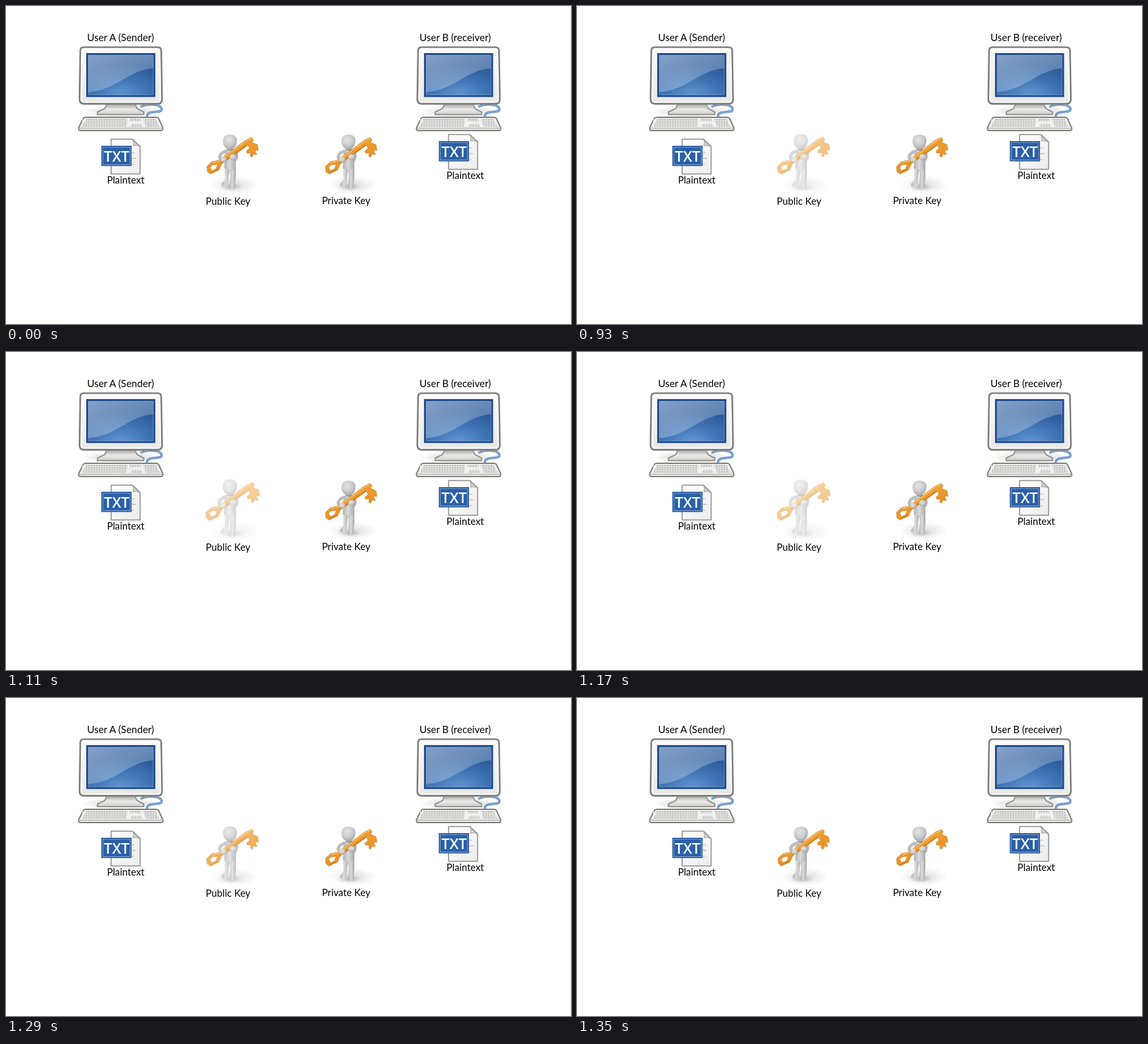
Animation of 853 by 480 pixels, one loop 1.88 s. Source, as an HTML page:

```html
<!DOCTYPE html>
<html lang="en">
<head>
<meta charset="utf-8">
<title>Public and private keys</title>
<style>
  html, body { margin: 0; width: 100%; height: 100%; overflow: hidden; background: #fff; }
  svg { display: block; width: 100%; height: 100%; }
  .label { font: 15px Lato, Carlito, sans-serif; text-anchor: middle; fill: #000; }
  .small { font-size: 14.7px; }
  .badge { font: 600 22px "Open Sans", "Noto Sans", sans-serif; text-anchor: middle; fill: #fff; }
  .pulse { transform-origin: 341px 236px; animation: pulse 1880ms step-end infinite; }
  /* quick half fade with a slight swell, sampled every 60 ms */
  @keyframes pulse {
    0%     { opacity: 1;   transform: scale(1); }
    49.46% { opacity: .56; transform: scale(1.018); }
    52.65% { opacity: .5;  transform: scale(1.03); }
    55.85% { opacity: .5;  transform: scale(1.042); }
    59.04% { opacity: .5;  transform: scale(1.046); }
    62.23% { opacity: .5;  transform: scale(1.034); }
    65.42% { opacity: .5;  transform: scale(1.022); }
    68.61% { opacity: .75; transform: scale(1.01); }
    71.8%  { opacity: 1;   transform: scale(1); }
  }
</style>
</head>
<body>
<svg viewBox="0 0 853 480">
  <defs>
    <linearGradient id="case" x1="0" y1="0" x2="0" y2="1">
      <stop offset="0" stop-color="#fafafa"/><stop offset="1" stop-color="#e8e8e6"/>
    </linearGradient>
    <radialGradient id="screen" cx=".5" cy="1" r=".75">
      <stop offset="0" stop-color="#5f97d3"/><stop offset=".55" stop-color="#3f74b4"/><stop offset="1" stop-color="#2c5c9c"/>
    </radialGradient>
    <linearGradient id="glare" x1="0" y1="0" x2="1" y2="1">
      <stop offset="0" stop-color="#fff" stop-opacity=".42"/><stop offset="1" stop-color="#fff" stop-opacity=".14"/>
    </linearGradient>
    <linearGradient id="stand" x1="0" y1="0" x2="0" y2="1">
      <stop offset="0" stop-color="#a2a3a1"/><stop offset=".5" stop-color="#ececeb"/><stop offset="1" stop-color="#c9cac7"/>
    </linearGradient>
    <linearGradient id="paper" x1="0" y1="0" x2="1" y2="1">
      <stop offset="0" stop-color="#fff"/><stop offset="1" stop-color="#ececeb"/>
    </linearGradient>
    <linearGradient id="gold" x1="0" y1="0" x2=".6" y2="1">
      <stop offset="0" stop-color="#f6ac40"/><stop offset="1" stop-color="#e48a1c"/>
    </linearGradient>
    <radialGradient id="skin" cx=".42" cy=".35" r=".68">
      <stop offset="0" stop-color="#e4e4e4"/><stop offset=".6" stop-color="#cacaca"/><stop offset="1" stop-color="#a0a0a0"/>
    </radialGradient>
    <linearGradient id="limb">
      <stop offset="0" stop-color="#b2b2b2"/><stop offset=".45" stop-color="#dadada"/><stop offset="1" stop-color="#a8a8a8"/>
    </linearGradient>
    <radialGradient id="shade">
      <stop offset="0" stop-color="#777" stop-opacity=".42"/><stop offset="1" stop-color="#777" stop-opacity="0"/>
    </radialGradient>

    <path id="cable" d="M203 152C218 146 235 149 235 156C235 163 212 156 213 167" fill="none"/>

    <g id="computer">
      <ellipse cx="174" cy="159" rx="60" ry="9" fill="url(#shade)"/>
      <use href="#cable" stroke="#3d6eae" stroke-width="3.2"/>
      <use href="#cable" stroke="#8db4e2" stroke-width="1.6"/>
      <path d="M152 148H195L198 155L208 160V164H138V160L149 155Z" fill="url(#stand)" stroke="#858782" stroke-width="1.6" stroke-linejoin="round"/>
      <path d="M117 62.2H229Q234 62.2 234.3 67L235.6 141Q235.6 147.6 229 147.6H118Q111 147.6 111 141L112.2 67Q112.4 62.2 117 62.2Z" fill="url(#case)" stroke="#7d7f7a" stroke-width="2.6"/>
      <path d="M118 64.5H228.5Q232 64.5 232.2 68L233.2 140Q233 145.2 228 145.2H119Q113.5 145.2 113.5 140L114.6 68Q114.8 64.5 118 64.5Z" fill="none" stroke="#fff" stroke-width="1.5"/>
      <rect x="122.5" y="72.5" width="101.5" height="63.5" fill="url(#screen)" stroke="#1f4a8a" stroke-width="2.8"/>
      <path d="M124 74H222.5V94C183 97 168 127 124 130Z" fill="url(#glare)"/>
      <rect x="124.6" y="74.6" width="97.4" height="59.4" fill="none" stroke="#a2bfdf" stroke-opacity=".4"/>
      <path d="M120 168H227Q229.5 168 230.5 170L236.5 183Q238 188 234 188H112.5Q108.5 188 110 183L116.5 170Q117.5 168 120 168Z" fill="#f2f2f0" stroke="#7f817c" stroke-width="2"/>
      <path d="M111 184.5H235.5" stroke="#bfc0bc" stroke-width="2"/>
      <path d="M121 170.5H183L182 182H114.5ZM187 170.5H203L204 174.5H186.5ZM189 178H204L206 182H188ZM207 170.5H226L231.5 182H211Z" fill="#bcbdb9"/>
      <g stroke="#f0f0ee">
        <path d="M118 173.5H228M116 176.5H229M114 179.5H231"/>
        <path d="M115 176H231" stroke-width="12" stroke-dasharray=".9 3"/>
      </g>
    </g>

    <g id="file">
      <path d="M158.700 201H191L202.500 212V253.500H158.700Z" fill="url(#paper)" stroke="#8c8e8b" stroke-width="1.500" stroke-linejoin="round"/>
      <path d="M190.500 201.500C193 204 192.500 208 191.500 211C196 210 200 210.500 202.500 213Z" fill="#cfd0cd" stroke="#9b9d99" stroke-width=".9"/>
      <path d="M190 221.500H194M190 230H196M190 239H193" stroke="#c2c3c0" stroke-width="1.600"/>
      <rect x="144" y="211" width="45.500" height="30.500" fill="#1e4f94"/>
      <rect x="146" y="213" width="41.500" height="26.500" fill="#2a60a9" stroke="#86a8d2"/>
      <text class="badge" x="167" y="234.500">TXT</text>
    </g>

    <g id="holder">
      <ellipse cx="345" cy="270" rx="36" ry="14" fill="url(#shade)" opacity=".6"/>
      <ellipse cx="340" cy="273" rx="18" ry="6" fill="url(#shade)"/>
      <path d="M330 240H339L336.500 255L335 270Q333 274 327 272Q323.500 270 326.500 267L330.500 262Z" fill="url(#limb)"/>
      <path d="M338 240H347L347 257L346 269Q348 276 342 277Q336 277 337.500 271L338.500 259Z" fill="url(#limb)"/>
      <path d="M331 218Q338 214 345 218Q348 221 347 229L347 245Q338 249 329.500 245L330 231Z" fill="url(#limb)"/>
      <path d="M334 216Q338 219 343 216" fill="none" stroke="#858585" stroke-width="1.500"/>
      <path d="M327.500 203C328 197 332 194 338 194C344 194 348.500 197 348.500 203C348.500 211 344 216.500 338 216.500C332 216.500 327.200 211 327.500 203Z" fill="url(#skin)"/>
      <path d="M332 219Q323 222 322.500 228Q324 233 330 232" fill="none" stroke="#bdbdbd" stroke-width="5" stroke-linecap="round"/>
      <path d="M346 220Q350 226 346 232" fill="none" stroke="#b2b2b2" stroke-width="5" stroke-linecap="round"/>
      <path fill-rule="evenodd" fill="url(#gold)" stroke="#c47a1c" stroke-width=".7" stroke-linejoin="round"
        d="M303.500 242L311 235L321 233L362 202.500L371 198.500L373.500 202L371.500 206L379.500 209.500L381 218L377 217L376.500 221L379 223L376.500 224.500L374 223L371 228.500L368.500 226L370 222L364 222L363 219L367.500 215L365.500 210L325.500 238.500L321.500 247.500L308.500 253.500L304 250ZM308 243L310.500 248.500L317 246L319.500 239L312.500 239.500Z"/>
      <path d="M312 236.300L321.500 234L363 203.500L370.500 200" fill="none" stroke="#fdc878" stroke-width="1.200"/>
      <path d="M325 237.500L364 210M309 252L320.500 246.500" fill="none" stroke="#c97a16" stroke-width="1.200"/>
      <ellipse cx="328.500" cy="232" rx="4.700" ry="4.200" fill="url(#skin)"/>
      <ellipse cx="342.500" cy="228" rx="5" ry="4.500" fill="url(#skin)"/>
    </g>
  </defs>

  <use href="#computer"/>
  <use href="#computer" x="510"/>
  <use href="#file"/>
  <use href="#file" x="509.500" y="-7"/>
  <g class="pulse"><use href="#holder"/></g>
  <use href="#holder" x="179"/>

  <g class="label">
    <text x="173" y="53">User A (Sender)</text>
    <text x="678.200" y="53">User B (receiver)</text>
    <text class="small" x="180.700" y="268">Plaintext</text>
    <text class="small" x="693.300" y="261">Plaintext</text>
    <text class="small" x="335.200" y="300">Public Key</text>
    <text class="small" x="513.500" y="299">Private Key</text>
  </g>
</svg>
</body>
</html>
```
